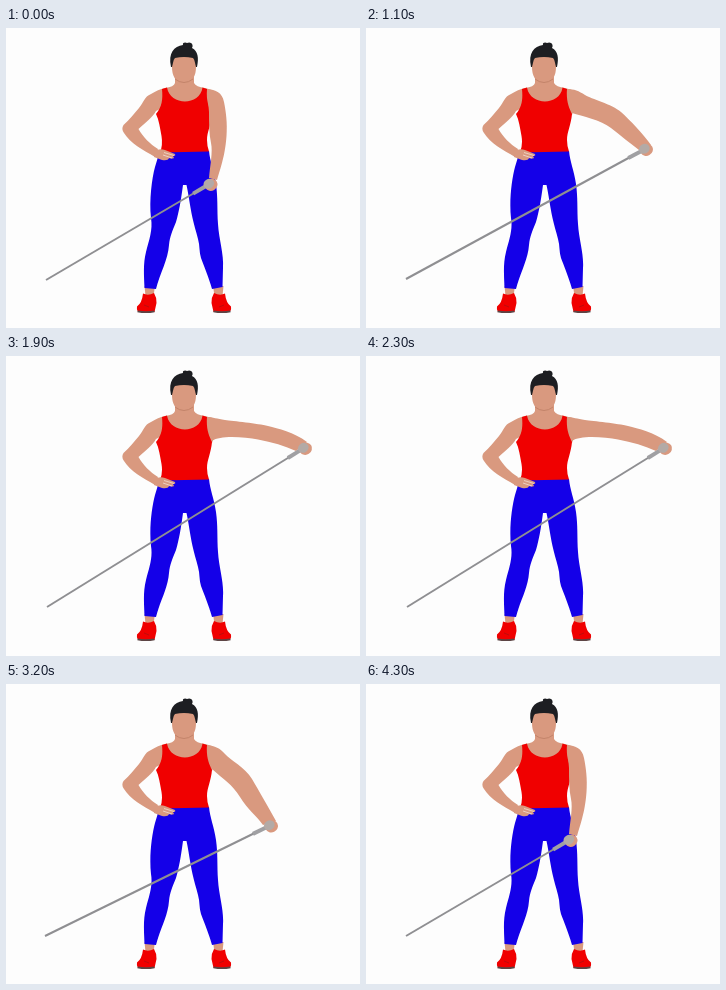
Animation, 354 px wide and 300 px high, one loop 4.4 s. Source, as an HTML page without scripts:

```html
<!DOCTYPE html>
<html lang="en">
<head>
<meta charset="utf-8">
<title>Cable lateral raise</title>
<style>
  html, body { margin: 0; width: 100%; height: 100%; overflow: hidden; background: #fdfdfd; }
  svg { display: block; width: 100vw; height: 100vh; }
  .skin { fill: #d9997f; }
  .red { fill: #f00000; }
  .blue { fill: #1400e8; }
  .hair { fill: #1d1e22; }
  .shade { fill: none; stroke: #c08268; stroke-width: .9; }

  /* poses a (arm down) to g (arm raised) */
  .arm {
    --a: path("M201 61C210 62 216 64 218 74S221.500 95 220.500 108S218 130 211 152L203 150C204 138 207 124 205 115S203 95 203 84Z");
    --b: path("M201 61C210 62 217 65 219 74S224 95 224 108S223 132 218 152L208 150C209 138 211 124 209 115S205 97 204 86Z");
    --c: path("M201 61C209 62 215 65 219 73S230 92 233 103S241 132 243 149L232 149C230 138 225 127 219 115S210 93 206 87Z");
    --d: path("M201 61C209 62 214 64 219 70S239 83 246 95S263 124 270 137L257 141C250 131 242 126 234 113S218 96 206 85Z");
    --e: path("M201 61C208 61 213 63 219 67S246 76 255 84S278 107 285 117L273 122C264 115 255 108 245 100S216 88 206 85Z");
    --f: path("M201 61C207 61 212 63 219 65.500S252 71 262 75.500S290 87 301 94L290 101C279 98 266 94 252 89S215 80 206 85Z");
    --g: path("M201 61C207 61 211 63 219 64S252 67.500 262 70S288 76 301 86L290 95C279 90 266 86 252 83.500S214 79 206 85Z");
  }
  .cable {
    --a: path("M40 252L203.500 156");
    --b: path("M39 254L212.500 156");
    --c: path("M41 253.500L236 153");
    --d: path("M39 252L264 141.500");
    --e: path("M40 251L279 121");
    --f: path("M42 250L298 99");
    --g: path("M41 251L298 92");
    fill: none;
    stroke: #8f8f92;
    stroke-width: 2;
    marker-end: url(#grip);
  }
  .arm, .cable { d: var(--a); animation: raise 4.4s infinite; }

  @keyframes raise {
    0%     { d: var(--a); animation-timing-function: steps(3); }
    6.81%  { d: var(--b); animation-timing-function: steps(4); }
    15.9%  { d: var(--c); animation-timing-function: steps(2); }
    20.45% { d: var(--d); animation-timing-function: steps(2); }
    24.99% { d: var(--e); animation-timing-function: steps(4); }
    34.09% { d: var(--f); animation-timing-function: steps(4); }
    43.18% { d: var(--g); animation-timing-function: steps(4); }
    52.27% { d: var(--g); animation-timing-function: steps(4); }
    61.36% { d: var(--f); animation-timing-function: steps(3); }
    68.18% { d: var(--e); animation-timing-function: steps(2); }
    72.72% { d: var(--d); animation-timing-function: steps(3); }
    79.54% { d: var(--c); animation-timing-function: steps(4); }
    88.63% { d: var(--b); animation-timing-function: steps(4); }
    97.72%, 100% { d: var(--a); }
  }
</style>
</head>
<body>
<svg viewBox="0 0 354 300">
  <defs>
    <marker id="grip" orient="auto" markerUnits="userSpaceOnUse" markerWidth="40" markerHeight="40" overflow="visible">
      <ellipse class="skin" cx="1" cy="1.500" rx="6.500" ry="6"/>
      <path d="M-19 0H-5" stroke="#a0a0a3" stroke-width="4"/>
      <ellipse cx="-.5" cy="-.5" rx="5.500" ry="4.800" fill="#b3aaa6"/>
    </marker>
    <g id="foot">
      <path class="skin" d="M138.500 258H149L147.500 268H139.500Z"/>
      <path class="red" d="M137 265.500Q142 268 148 265Q151 270 150.500 275L148.500 284H133Q130.500 283 131 278.500Q136 275 137 265.500Z"/>
      <path d="M131.500 283.300Q140 285 148.500 283.300" fill="none" stroke="#5c4444" stroke-width="1.8"/>
      <path d="M138 277L143 279" fill="none" stroke="#b01010" stroke-width=".8"/>
    </g>
  </defs>

  <use href="#foot"/>
  <use href="#foot" transform="matrix(-1 0 0 1 356 0)"/>

  <path class="blue" d="M153 123H203C204 134 208 142 210 156C212 170 211 182 212 196C213 212 218 226 217 240L216.500 259L206 261C203 250 198 238 195 230C193 224 194 218 192 211C190 203 188 197 186.500 190C184 178 182.500 166 180.500 157H177C175 172 173 184 170 194C166 204 164 208 163 217C162 232 154 245 150 261L138.500 260C138 247 137 236 140 224C143 212 147 202 145 190C143 172 146 150 149 139Q152 130 153 123Z"/>

  <!-- neck, shoulders and the arm resting on the hip -->
  <path class="skin" d="M169 48H188V55Q190 59 199 60L206 62L211 74Q208 80 206 87L200 80H156L150 83C147 89 139 95 132.500 101C137 109 144 116 152 121L149 129C137 122 124 115 118 105Q115 101 117.500 97C124 91 128 86 133 80C138 74 138 69 145 66C150 63 154 61 159 60Q168 59 169 55Z"/>
  <path class="red" d="M156 61L161 59.500C164 78 194 78 196.500 59.500L201 61C200 73 203 80 206 86C205 97 201 104 201 112Q201 118 203 123.500L154 124.500Q157 117 155.500 108C154 100 153 92 150 86C156 79 157 71 156 61Z"/>
  <path class="skin" d="M148 123Q154 120 159 122L169 126Q170 128 167 128L168 130Q166 131 163 130Q162 133 156 132L148 129Z"/>
  <path d="M158 124.500L168 127.500M157 127L166 130" fill="none" stroke="#f3ddd2" stroke-width=".8"/>

  <!-- head -->
  <path class="hair" d="M165 39C162 25 168 18 177 17C176 14 180 14 181 15C185 13 188 17 186 20C192 23 193 30 191 39Z"/>
  <path class="skin" d="M166 39C167 36 167 32 169 30Q178 28 187 30C189 32 189 36 190 39C190 47 187 55 178 55S166 47 166 39Z"/>
  <path class="shade" d="M169 51Q178 58 187 51"/>

  <path class="skin arm"/>
  <path class="cable"/>
</svg>
</body>
</html>
```
